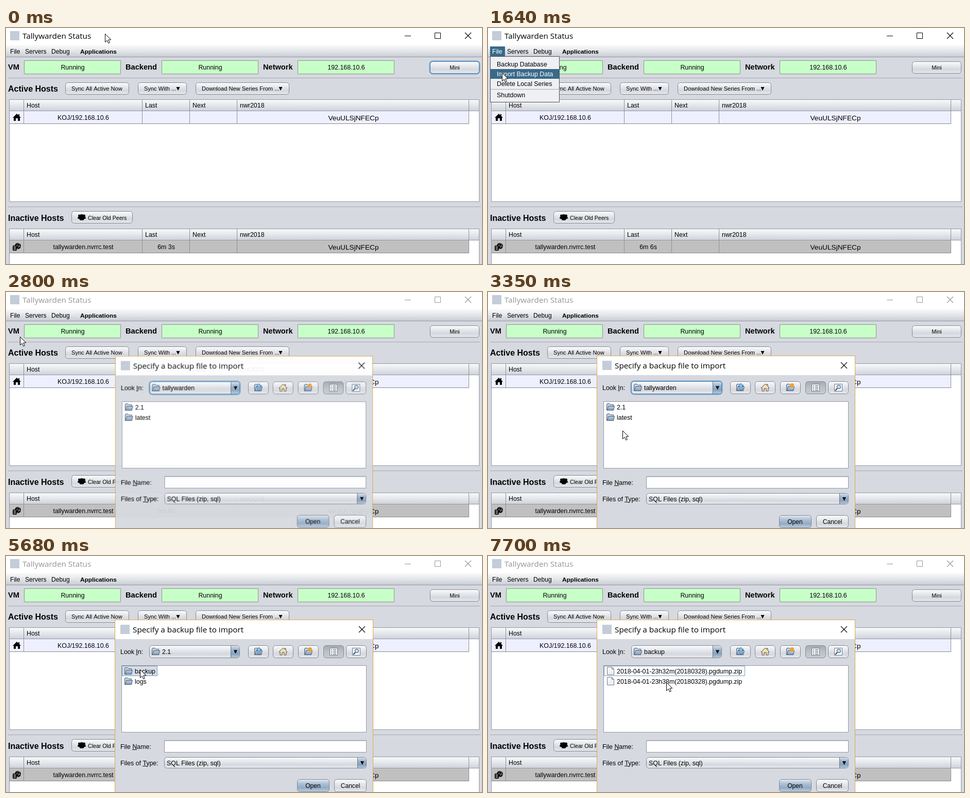
Write an HTML page with a canvas that moves like this. It is 924 px wide and 460 px high and loops after 8000 ms.

```html
<!DOCTYPE html>
<html>
<head>
<meta charset="utf-8">
<style>
  html, body { margin: 0; width: 100%; height: 100%; overflow: hidden; }
  canvas { display: block; }
</style>
</head>
<body>
<canvas id="stage" width="924" height="460"></canvas>
<script>
const LOOP = 8000;
const APP = 'Tallywarden';
const GREY = '#8d9098', FACE = '#d6d9df', BLUE = '#39698a';
const screen = document.getElementById('stage').getContext('2d');
const layer = document.createElement('canvas');
layer.width = 924;
layer.height = 600;
const layerContext = layer.getContext('2d');
let c = screen;

// Cursor moves: start, end, steps, then a Bezier's two controls and its end.
const MOVES = [
  [80, 700, 9, 170, -10, 60, 60, 14, 49],
  [1330, 1640, 5, 16, 60, 23, 75, 27, 87],
  [3040, 3820, 11, 200, 290, 476, 360, 262, 229],
  [3910, 4130, 4, 260, 228, 255, 227, 253, 227],
  [5210, 5300, 2, 254, 225, 257, 222, 259, 221],
  [5680, 5680, 1, 260, 221, 260, 221, 260, 221],
  [6550, 7100, 8, 255, 282, 320, 280, 346, 239],
  [7390, 7390, 1, 346, 245, 346, 245, 346, 245],
  [7700, 7700, 1, 346, 246, 346, 246, 346, 246]
];

const FOLDERS = [
  { from: 0, name: APP.toLowerCase(), items: ['2.1', 'latest'], width: 51 },
  { from: 4600, name: '2.1', items: ['backup', 'logs'], width: 69 },
  { from: 5990, name: 'backup', files: true, width: 274,
    items: [32, 38].map(m => `2018-04-01-23h${m}m(20180328).pgdump.zip`) }
];

function stepIndex(t, start, end, count) {
  if (t < start) return -1;
  if (start === end) return count - 1;
  return Math.min(count - 1, Math.floor((t - start) / (end - start) * (count - 1) + 0.25));
}

function cursorAt(t) {
  let x = 192, y = 11;
  for (const [start, end, count, ax, ay, bx, by, ex, ey] of MOVES) {
    if (t < start) break;
    const p = (stepIndex(t, start, end, count) + 1) / count;
    const e = p * p * (3 - 2 * p), r = 1 - e;
    const bezier = (o, a, b, d) => r * r * r * o + 3 * r * r * e * a + 3 * r * e * e * b + e * e * e * d;
    x = bezier(x, ax, bx, ex);
    y = bezier(y, ay, by, ey);
  }
  return [Math.round(x), Math.round(y)];
}

function shade(y, h, ...colors) {
  const g = c.createLinearGradient(0, y, 0, y + h);
  colors.forEach((color, i) => g.addColorStop(i / (colors.length - 1), color));
  return g;
}

function fill(x, y, w, h, color) {
  c.fillStyle = color;
  c.fillRect(x, y, w, h);
}

function box(x, y, w, h, color, border, radius = 0, line = 1) {
  c.beginPath();
  c.roundRect(x + 0.5, y + 0.5, w - 1, h - 1, radius);
  if (color) { c.fillStyle = color; c.fill(); }
  if (border) { c.strokeStyle = border; c.lineWidth = line; c.stroke(); }
}

function shape(points, color, border, width = 1) {
  c.beginPath();
  for (let i = 0; i < points.length; i += 2) c.lineTo(points[i], points[i + 1]);
  c.closePath();
  if (color) { c.fillStyle = color; c.fill(); }
  if (border) { c.strokeStyle = border; c.lineWidth = width; c.stroke(); }
}

function disc(x, y, rx, ry, color) {
  c.beginPath();
  c.ellipse(x, y, rx, ry, 0, 0, Math.PI * 2);
  c.fillStyle = color;
  c.fill();
}

function text(s, x, y, { size = 12.4, bold = false, color = '#000', align = 'left', font = 'Liberation Sans' } = {}) {
  c.font = `${bold ? 'bold ' : ''}${size}px "${font}", sans-serif`;
  c.fillStyle = color;
  c.textAlign = align;
  c.fillText(s, x, y);
}

const centered = (s, x, y, size) => text(s, x, y, { size, align: 'center' });

function mnemonic(s, key, x, y) {
  text(s, x, y);
  const i = s.indexOf(key);
  fill(Math.round(x + c.measureText(s.slice(0, i)).width), y + 1, Math.ceil(c.measureText(key).width), 1, '#000');
}

const arrow = (x, y) => shape([x - 3.5, y - 3, x + 3.5, y - 3, x, y + 4], '#000');

function button(x, y, w, h, focus, colors = ['#fdfdfe', '#e8eaee', '#d5d8de', '#e9ebef']) {
  if (focus) box(x - 1, y - 1, w + 2, h + 2, null, '#73a4d1', 6, 2);
  box(x, y, w, h, shade(y, h, ...colors), focus ? '#557fa6' : '#858992', 5);
}

function caption(s, color) {
  return { size: 15.3, font: 'Open Sans', color };
}

function closeMark(x, y, color) {
  c.beginPath();
  c.moveTo(x, y); c.lineTo(x + 12, y + 12);
  c.moveTo(x + 12, y); c.lineTo(x, y + 12);
  c.strokeStyle = color;
  c.lineWidth = 1.1;
  c.stroke();
}

function house(x, y, color, border) {
  shape([x, y + 8, x + 8, y, x + 11, y + 3, x + 11, y + 1, x + 13, y + 1, x + 13, y + 5, x + 16, y + 8,
    x + 14, y + 8, x + 14, y + 14, x + 10, y + 14, x + 10, y + 9, x + 6, y + 9, x + 6, y + 14, x + 2, y + 14, x + 2, y + 8],
    color, border);
}

function folderIcon(x, y, light = '#c2d2e3', dark = '#7897b8') {
  shape([x + .5, y + 13.5, x + .5, y + 1.5, x + 2, y + .5, x + 6, y + .5, x + 8, y + 2.5, x + 13.5, y + 2.5, x + 13.5, y + 13.5],
    light, '#4a5a70');
  shape([x + 1.5, y + 13.5, x + 3.5, y + 5.5, x + 15.5, y + 5.5, x + 13.5, y + 13.5], shade(y + 5, 9, light, dark), '#4a5a70');
}

function fileIcon(x, y) {
  shape([x + .5, y + .5, x + 9.5, y + .5, x + 13.5, y + 4.5, x + 13.5, y + 15.5, x + .5, y + 15.5],
    shade(y, 16, '#fff', '#e4e8ee'), '#777d87');
  shape([x + 9.5, y + .5, x + 9.5, y + 4.5, x + 13.5, y + 4.5], '#d4dae2', '#777d87');
}

function peopleIcon(x, y) {
  for (const [dx, dy, r] of [[3.5, 4, 2.5], [12.5, 4, 2.5], [8, 4.5, 3.4]]) {
    disc(x + dx, y + dy, r, r, '#000');
    c.beginPath();
    c.roundRect(x + dx - r * 1.35, y + dy + r * .8, r * 2.7, r * 1.6, r * .7);
    c.fill();
  }
}

function serverIcon(x, y) {
  disc(x + 10, y + 6, 6, 6, '#000');
  c.strokeStyle = '#c0c0c0';
  c.lineWidth = .8;
  c.beginPath();
  c.ellipse(x + 10, y + 6, 2.5, 6, .4, 0, 7);
  c.moveTo(x + 4, y + 5); c.lineTo(x + 16, y + 7);
  c.stroke();
  box(x, y + 5, 8, 10, '#222', '#000', 1);
  for (let i = 0; i < 3; i++) fill(x + 2, y + 7 + i * 2.5, 4, 1, '#c0c0c0');
}

function table(y, h, rowColor, host, last) {
  box(6, y, 913, h, '#fff', '#9297a1');
  fill(7, y + 1, 911, 21, shade(y, 22, '#fafafb', '#e6e8ec', '#cfd3da'));
  fill(7, y + 22, 911, 1, '#9297a1');
  fill(7, y + 23, 892, 24, rowColor);
  fill(7, y + 47, 892, 1, '#85878c');
  for (const x of [34, 264, 356, 448, 898]) fill(x, y + 1, 1, 47, GREY);
  ['Host', 'Last', 'Next', 'nwr2018'].forEach((s, i) => text(s, [40, 270, 362, 454][i], y + 16));
  centered(host, 150, y + 40);
  centered(last, 311, y + 40);
  centered('VeuULSjNFECp', 674.5, y + 41, 13.7);
}

function drawWindow(t) {
  const tone = t < 2560 ? '#000' : '#969696';
  fill(0, 0, 924, 460, FACE);
  fill(0, 0, 924, 33, '#fff');
  fill(8, 6, 18, 18, '#c3ccd8');
  text(APP + ' Status', 32, 21, caption(APP, tone));
  fill(774, 15, 12, 1, tone);
  box(832, 9, 12, 12, null, tone);
  closeMark(891, 9, tone);

  fill(0, 33, 924, 23, shade(33, 23, '#fbfbfc', '#e4e6ea', '#c9cdd4'));
  fill(0, 56, 924, 1, '#9297a1');
  ['File', 'Servers', 'Debug'].forEach((s, i) => text(s, [8, 37, 88][i], 50, { size: 12.1 }));
  text('Applications', 144, 50, { size: 11.8, bold: true });

  [['VM', 4, 35, 'Running'], ['Backend', 232, 302, 'Running'], ['Network', 499, 566, '192.168.10.6']]
    .forEach(([name, x, left, value]) => {
      text(name, x, 81, { size: 14.6, bold: true });
      box(left, 63, 188, 27, '#c8ffc8', '#8b988d');
      centered(value, left + 94.5, 81);
    });
  button(823, 65, 96, 24, t < 780);
  centered('Mini', 871, 81, 10.6);
  fill(4, 97, 917, 1, '#a5a9b1');
  fill(4, 348, 917, 1, '#a5a9b1');

  text('Active Hosts', 4, 124, { size: 16, bold: true });
  [[115, 124, 'Sync All Active Now'], [256, 95, 'Sync With ...'], [368, 182, 'Download New Series From ...']]
    .forEach(([x, w, s], i) => {
      button(x, 106, w, 24);
      text(s, x + 12, 122, { size: 11.1 });
      if (i) arrow(x + w - 17, 118);
    });
  table(139, 200, '#eef0ff', 'KOJ/192.168.10.6', '');
  house(13, 167, '#000');

  text('Inactive Hosts', 4, 376, { size: 16, bold: true });
  button(127, 357, 119, 24);
  peopleIcon(139, 362);
  text('Clear Old Peers', 159, 374, { size: 10.6 });
  table(391, 80, '#c0c0c0', APP.toLowerCase() + '.nvrrc.test', t < 470 ? '6m 3s' : '6m 6s');
  serverIcon(13, 419);
}

function drawMenu(cursorY) {
  fill(4, 36, 29, 19, BLUE);
  text('File', 8, 50, { size: 12.1, color: '#fff' });
  box(4, 55, 135, 90, '#eff0f3', '#4b4f57');
  fill(5, 119, 133, 1, '#a5a9b1');
  ['Backup Database', 'Import Backup Data', 'Delete Local Series', 'Shutdown'].forEach((s, i) => {
    const y = i < 3 ? 61 + i * 19 : 121;
    const hover = cursorY >= y && cursorY < y + 19;
    if (hover) fill(5, y, 133, 19, BLUE);
    text(s, 17, y + 14, { color: hover ? '#fff' : '#000' });
  });
}

function combo(x, y, w, h, focus) {
  button(x, y, w, h, focus);
  c.save();
  c.beginPath();
  c.roundRect(x + 1, y + 1, w - 2, h - 2, 4);
  c.clip();
  fill(x + w - 17, y, 17, h, shade(y, h, '#dfe7f0', '#9fb6ce', '#86a2be', '#bccddd'));
  fill(x + w - 18, y, 1, h, '#5d7690');
  c.restore();
  arrow(x + w - 8.5, y + h / 2);
}

function drawToolbar() {
  [470, 518, 567, 616, 660].forEach((x, i) => {
    const pressed = i === 3;
    button(x, 174, 40, 25, false, pressed ? ['#a4a8b0', '#bcc0c7', '#c8cbd1'] : undefined);
    const left = x + 12;
    if (i === 0) {
      folderIcon(left, 179);
      shape([left + 9, 178, left + 14, 184, left + 11, 184, left + 11, 191, left + 7, 191, left + 7, 184, left + 4, 184], '#8fc4ea', '#376a96');
    } else if (i === 1) {
      house(left, 179, '#f2dfb4', '#554f4a');
    } else if (i === 2) {
      folderIcon(left, 179);
      disc(left + 11, 182, 4, 4, '#f0a030');
    } else if (pressed) {
      box(left, 179, 16, 15, '#f4f6f8', '#6e7b8b');
      for (let y = 182; y < 193; y += 3) {
        fill(left + 3, y, 2, 1, '#2e5d8c');
        fill(left + 7, y, 6, 1, '#555c66');
      }
    } else {
      box(left, 179, 16, 15, '#f4f6f8', '#6e7b8b');
      disc(left + 9, 185, 4, 4, '#4a6c90');
      disc(left + 9, 185, 2.8, 2.8, '#c9e2f4');
      shape([left + 6, 188, left + 2, 192], null, '#33485e', 2);
    }
  });
}

function drawDialog(t) {
  const folder = FOLDERS.filter(f => t >= f.from).pop();
  const selected = t >= 4130 && t < 4600 || t >= 5610 && t < 5990;
  box(211, 124, 502, 346, FACE, '#dba94a');
  fill(212, 125, 500, 37, '#fff');
  fill(222, 134, 18, 18, '#c3ccd8');
  text('Specify a backup file to import', 246, 149, caption());
  closeMark(685, 137, '#000');

  mnemonic('Look In:', 'I', 222, 191);
  combo(278, 174, 176, 25, t < 3980);
  folderIcon(283, 179);
  text(folder.name, 303, 191);
  drawToolbar();

  box(224, 213, 476, 131, '#fff', '#9297a1');
  if (t >= 4130) box(225, 214, folder.width, 20, selected ? '#d6dce6' : '#fff', '#7b9ebd');
  folder.items.forEach((s, i) => {
    const y = 217 + i * 20;
    if (folder.files) fileIcon(231, y - 1); else folderIcon(230, y);
    text(s, 250, y + 12);
  });

  mnemonic('File Name:', 'N', 222, 376);
  box(307, 359, 393, 24, '#fff', '#9297a1');
  fill(308, 360, 391, 1, '#d0d3d8');
  mnemonic('Files of Type:', 'T', 222, 408);
  combo(307, 392, 393, 22);
  text('SQL Files (zip, sql)', 312, 408);
  button(565, 435, 63, 25, false, ['#e6edf4', '#afc2d6', '#92abc5', '#c0d0e0']);
  button(637, 435, 63, 25);
  centered('Open', 596, 452, 12.1);
  centered('Cancel', 668.5, 452, 12.1);
}

function draw(t) {
  const [x, y] = cursorAt(t);
  c = screen;
  drawWindow(t);
  if (t >= 780 && t < 2560) drawMenu(y);
  if (t >= 2560) {
    c = layerContext;
    c.clearRect(0, 0, 924, 600);
    drawDialog(t);
    c = screen;
    const left = 1 - stepIndex(t, 2560, 2890, 5) / 4;
    const scale = 1 - 0.053 * left * left;
    c.save();
    c.globalAlpha = 1 - left ** 2.1;
    c.translate(462, 297);
    c.scale(scale, scale);
    c.drawImage(layer, -462, -297);
    c.restore();
  }
  c.save();
  c.translate(x + 0.5, y + 0.5);
  shape([0, 0, 0, 16, 3.7, 12.6, 6.3, 18.2, 8.8, 17, 6.3, 11.5, 11.3, 11.3], '#fff', '#000');
  c.restore();
}

function tick() {
  draw(performance.now() % LOOP);
  requestAnimationFrame(tick);
}
tick();
</script>
</body>
</html>
```
